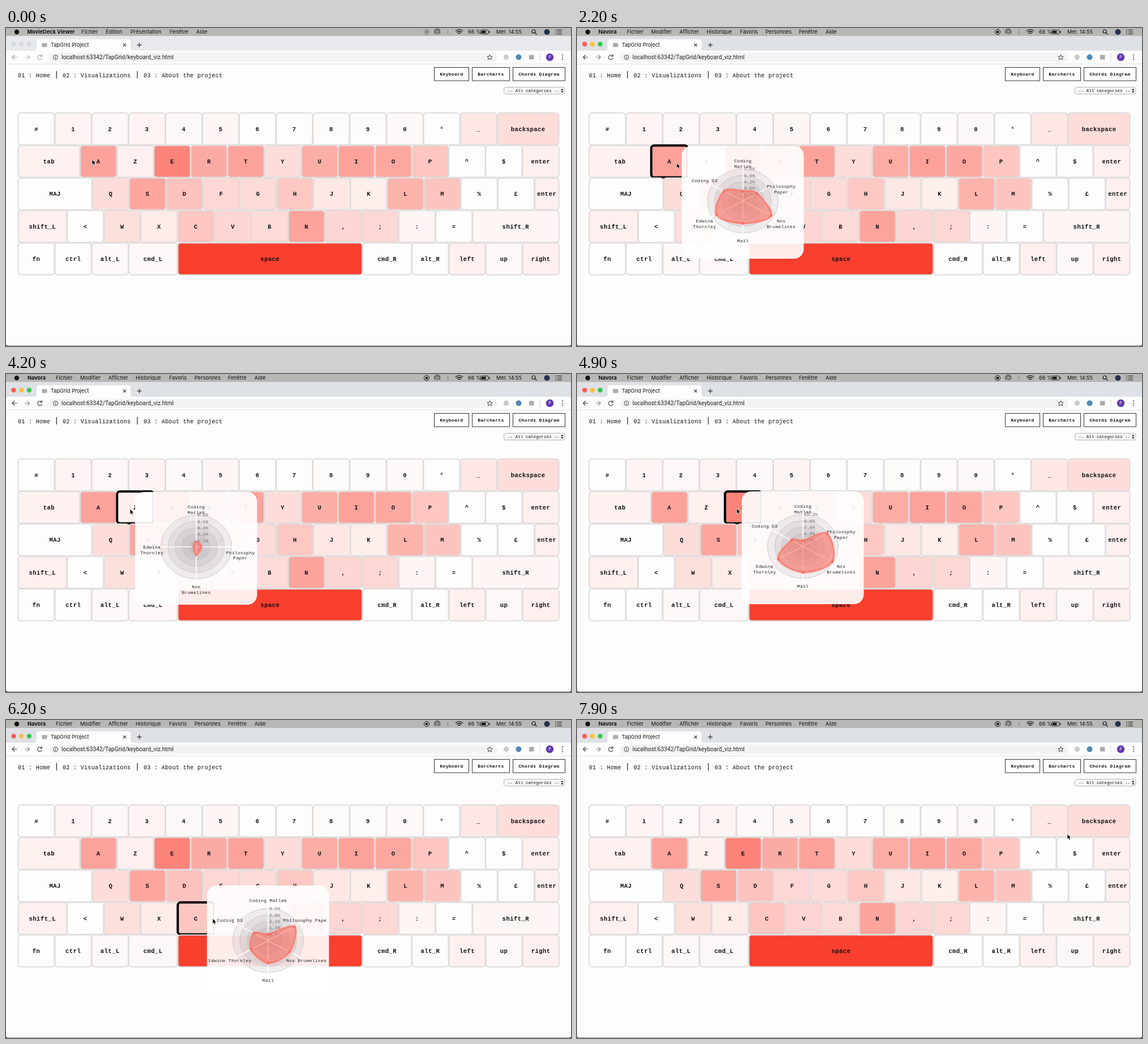
Write an HTML page that moves like this. It is 998 px wide and 561 px high and loops after 8 s.

```html
<!DOCTYPE html>
<html lang="fr">
<head>
<meta charset="utf-8">
<title>Keyboard heat map</title>
<style>
html, body { margin: 0; height: 100%; overflow: hidden; background: #222; }
svg { display: block; width: 998px; height: 561px; }
text { fill: #111; font-family: "Liberation Mono", monospace; }
.ui { font: 9.2px Inter, sans-serif; }
.strong { font-weight: 700; }
.url { font: 10.2px Roboto, sans-serif; fill: #222; }
.nav { font-size: 10.2px; letter-spacing: .22px; }
.btn { font-size: 8px; font-weight: 700; letter-spacing: .35px; }
.select { font-size: 7.6px; }
.key { font-size: 10.6px; font-weight: 700; letter-spacing: .42px; }
.label { font-size: 8px; letter-spacing: .3px; fill: #222; }
.pct { font-size: 8px; fill: #737373; }
.mid { text-anchor: middle; }
.line { fill: none; stroke: #444; stroke-width: 1.2; }
</style>
</head>
<body>
<svg viewBox="0 0 998 561">
  <defs>
    <clipPath id="inner"><rect x="3" width="209" height="270"/></clipPath>
    <filter id="glow" x="-30%" y="-30%" width="160%" height="160%">
      <feGaussianBlur stdDeviation="1.4" result="b"/>
      <feMerge><feMergeNode in="b"/><feMergeNode in="SourceGraphic"/></feMerge>
    </filter>
  </defs>
  <g id="window"></g>
  <g id="keys"></g>
  <g id="panel"></g>
  <path id="cursor" d="M0 0V9.6L2.2 7.6L3.8 11L5.5 10.2L4 6.9H7Z" fill="#000" stroke="#fff" stroke-width=".8"/>
</svg>
<script>
const $ = id => document.getElementById(id);
const text = (x, y, s, cls) => `<text x="${x}" y="${y}" dy=".35em" class="${cls}">${s}</text>`;
const rect = (x, y, w, h, fill, more = '') => `<rect x="${x}" y="${y}" width="${w}" height="${h}" fill="${fill}" ${more}/>`;
const dot = (x, y, r, fill, more = '') => `<circle cx="${x}" cy="${y}" r="${r}" fill="${fill}" ${more}/>`;
const path = (d, more = '') => `<path class="line" d="${d}" ${more}/>`;

// Browser window and menu bar
const menus = [
  [['MovieDeck Viewer', 37.5], ['Fichier', 133], ['Édition', 176], ['Présentation', 220], ['Fenêtre', 289], ['Aide', 336]],
  [['Navora', 38], ['Fichier', 88], ['Modifier', 131], ['Afficher', 181], ['Historique', 229], ['Favoris', 288],
    ['Personnes', 333], ['Fenêtre', 392], ['Aide', 439]]
];

function drawWindow(active) {
  const lights = active ? ['#fc5b57', '#fdbd40', '#34c84a'] : ['#d6d8da', '#d6d8da', '#d6d8da'];
  const tint = active ? '#444' : '#a5a8ab';
  const rec = active ? '#111' : '#777';
  return rect(0, 0, 998, 14, '#b7b7b5') +
    dot(19, 7, 4.2, '#111') +
    menus[+active].map(([s, x], i) => text(x, 7, s, i ? 'ui' : 'ui strong')).join('') +
    dot(743, 7, 4.5, 'none', `stroke="${rec}"`) + rect(741, 5, 4, 4, rec) +
    path('M758.5 10.5a5 5 0 1 1 6.5 0M760.3 9a2.8 2.8 0 1 1 3 0M761.8 7V11.5', 'stroke="#555"') +
    path('M778 4.5L782.5 9L780.3 11V3L782.5 5L778 9.5', 'style="stroke:#999;stroke-width:.8"') +
    path('M794 5.2Q800.5 0 807 5.2M796.2 7.6Q800.5 4 804.8 7.6M798.4 9.8Q800.5 8 802.6 9.8', 'style="stroke:#111;stroke-width:1.4"') +
    text(816, 7, '66 %', 'ui') +
    rect(838.5, 3.5, 13.5, 7, 'none', 'rx="1.5" stroke="#111" stroke-width=".9"') +
    rect(840, 5, 7.5, 4, '#111') + rect(853, 5.5, 1.5, 3, '#111') +
    text(866, 7, 'Mer. 14:55', 'ui') +
    dot(932, 6, 3, 'none', 'stroke="#111" stroke-width="1.2"') + path('M934.2 8.2L937.5 11.5', 'style="stroke:#111"') +
    dot(955.5, 7, 5, '#24304f') +
    path('M970 3.5h2M970 7h2M970 10.5h2M973.5 3.5H982M973.5 7H982M973.5 10.5H982', 'style="stroke:#111"') +
    // tabs
    rect(0, 14, 998, 40, active ? '#dee1e5' : '#e7e9ec') +
    lights.map((c, i) => dot(13.5 + 13.7 * i, 28.5, 4.2, c)).join('') +
    '<path d="M50 40Q54 40 54 36V24Q54 20 58 20H216Q220 20 220 24V36Q220 40 224 40Z" fill="#fdfdfd"/>' +
    rect(63.5, 26.5, 9, 7, '#aaa') +
    text(79, 30, 'TapGrid Project', 'ui') +
    path('M207 27.5L212 32.5M212 27.5L207 32.5') + path('M231.5 30H239.5M235.5 26V34', 'style="stroke-width:1.4"') +
    // toolbar
    rect(0, 40, 998, 520.5, '#fdfdfd', 'rx="3"') +
    path('M19.5 51.5H11M15 47.5L11 51.5L15 55.5', `style="stroke:${tint}"`) +
    path('M33 51.5H41.5M37.5 47.5L41.5 51.5L37.5 55.5', `style="stroke:${active ? '#888' : '#bbb'}"`) +
    path('M62.6 49A4 4 0 1 0 63.5 53M63.5 46.5V49.8H60', `style="stroke:${tint}"`) +
    rect(76, 43.5, 792, 16.5, '#f1f3f4', 'rx="8.2"') +
    dot(87.5, 51.7, 4, 'none', 'stroke="#444"') + path('M87.5 51V54M87.5 49V50') +
    text(98, 51.7, 'localhost:63342/TapGrid/keyboard_viz.html', 'url') +
    path('M854.5 47L855.9 50.2L859.2 50.4L856.7 52.6L857.5 56L854.5 54.1L851.5 56L852.3 52.6L849.8 50.4L853.1 50.2Z', 'style="stroke-width:1"') +
    dot(883.5, 51.5, 4.7, '#c9cccb') + dot(905.5, 51.5, 5, '#4d87b5') + rect(924, 47.5, 8.5, 8, '#aaa') +
    path('M943 44V59', 'style="stroke:#ddd"') +
    dot(960.5, 51.5, 6.7, '#6236ae') + `<text x="960.5" y="51.5" dy=".35em" class="ui mid" style="fill:#fff;font-size:7px">P</text>` +
    [47.5, 51.5, 55.5].map(y => dot(983, y, 1.1, '#444')).join('') +
    rect(0, 63, 998, 1, '#dedfe1') +
    // page header
    text(21, 83, '01 : Home', 'nav') + text(100, 83, '02 : Visualizations', 'nav') + text(243, 83, '03 : About the project', 'nav') +
    path('M89.3 76V89M232 76V89', 'style="stroke:#222"') +
    [['Keyboard', 756.5, 61], ['Barcharts', 823.5, 66], ['Chords Diagram', 895.5, 92]].map(([s, x, w]) =>
      rect(x, 69.5, w, 23.5, '#fff', 'stroke="#333"') + text(x + w / 2, 81.5, s, 'btn mid')).join('') +
    rect(879.5, 104.5, 107.5, 12, '#f6f6f6', 'rx="3" stroke="#b5b5b5"') +
    text(886, 110.5, '-- All categories --', 'select') +
    '<path d="M980 109.7L982.3 106.8L984.6 109.7ZM980 111.5L982.3 114.4L984.6 111.5Z" fill="#222"/>';
}

// Keyboard: "label heat [width]"
const UNIT = 65.1, LEFT = 21, TOP = 149.3, ROW = 57.35;
const rows = [
  '# 0|1 5|2 3|3 5|4 2|5 4|6 0|7 0|8 1|9 1|0 2|° 0|_ 11|backspace 17 109.7',
  'tab 6 109.7|A 48|Z 7|E 64|R 43|T 48|Y 17|U 42|I 48|O 45|P 29|^ 0|$ 0|enter 7',
  'MAJ 0 131.3|Q 17|S 46|D 31|F 20|G 18|H 28|J 11|K 8|L 39|M 30|% 0|£ 0|enter 7 43.5',
  'shift_L 7 86.6|&lt; 0|W 16|X 9|C 29|V 21|B 18|N 47|, 21|; 20|: 4|= 0|shift_R 4 153.3',
  'fn 0|ctrl 0|alt_L 2|cmd_L 3 86.8|space 100 326.5|cmd_R 0 87.2|alt_R 0|left 7|up 3|right 7'
];
const heatColor = h => `rgb(${254 - .05 * h},${253 - 1.9 * h},${253 - 2.07 * h})`;
const keys = rows.flatMap((row, r) => {
  let x = LEFT;
  return row.split('|').map(s => {
    const [label, heat, width = UNIT] = s.split(' ');
    const key = { label, heat, x, y: TOP + r * ROW, w: +width };
    x += key.w;
    return key;
  });
});
$('keys').innerHTML = keys.map(k =>
  rect(k.x + .5, k.y + .5, k.w - .9, ROW - 1, heatColor(k.heat), 'rx="5"') +
  text(k.x + k.w / 2, k.y + ROW / 2, k.label, 'key mid')).join('');
const keyRects = [...$('keys').querySelectorAll('rect')];

// Radar panels: anchor, largest share, value on each axis
const RX = 62.5, RY = 56.5, CX = 108, CY = 97;
const six = ['Coding Matlab', ' Philosophy Paper', 'Nos Brumelines', 'Mail', 'Edwina Thornley', 'Coding D3'];
const four = [six[0], six[1], six[2], six[4]];
const radars = {
  A: { at: [176, 238], max: 7, v: [.3, .46, .92, .7, .86, .61] },
  Z: { at: [219, 238], max: .64, v: [.17, .14, .25, .08], names: four },
  E: { at: [282, 237], max: 12.3, v: [.18, .79, .96, .81, .8, .37] },
  D: { at: [315, 275], max: 4.2, v: [.4, .7, .8, .65, .9, .55] },
  C: { at: [346, 322], max: 3.5, v: [.2, .86, .7, .7, .55, .46], oneLine: true },
  space: { at: [386, 402], max: 16.7, v: [.26, .72, .92, .77, .97, .23] }
};

// Closed Catmull-Rom curve
function smooth(p) {
  const n = p.length, at = i => p[(i + n) % n];
  return 'M' + p[0] + p.map((a, i) => {
    const [o, b, c] = [at(i - 1), at(i + 1), at(i + 2)];
    const c1 = a.map((v, k) => v + (b[k] - o[k]) / 6), c2 = b.map((v, k) => v - (c[k] - a[k]) / 6);
    return `C${c1} ${c2} ${b}`;
  }).join('') + 'Z';
}

function drawPanel({ at, max, v, names = six, oneLine }) {
  const point = (i, f) => {
    const a = 2 * Math.PI * i / v.length;
    return [CX + RX * f * Math.sin(a), CY - RY * f * Math.cos(a)];
  };
  const pts = v.map((f, i) => point(i, f)), levels = [5, 4, 3, 2, 1];
  const labels = names.map((name, i) => {
    const [x, y] = point(i, 1.25);
    const lines = oneLine || name === 'Coding D3' ? [name.trim()] : name.split(' ');
    return lines.map((s, j) => text(x, y + 9.8 * j, s, 'label mid')).join('');
  }).join('');
  return `<g transform="translate(${at[0] + 9} ${at[1] - 30})">` +
    rect(0, 0, 215.5, 199, '#fff', 'rx="17" fill-opacity=".9"') + '<g clip-path="url(#inner)">' +
    levels.map(j => `<ellipse cx="${CX}" cy="${CY}" rx="${RX * j / 5}" ry="${RY * j / 5}" fill="#8a858a" fill-opacity=".13" stroke="#c4c0c6" stroke-width=".8"/>`).join('') +
    levels.map(j => text(CX + 2, CY - RY * j / 5, (max * j / 5).toFixed(1) + '%', 'pct')).join('') +
    v.map((_, i) => `<path d="M${CX} ${CY}L${point(i, 1.1)}" stroke="#fff" stroke-width="1.6"/>`).join('') + labels +
    `<g filter="url(#glow)"><path d="${smooth(pts)}" fill="#ff6f61" fill-opacity=".35" stroke="#fa7567" stroke-width="1.6"/>` +
    pts.map(([x, y]) => dot(x, y, v.length > 4 ? 2.3 : 1.5, '#fa7062')).join('') + '</g></g></g>';
}

// Pointer path: time, x, y
const track = [
  [0, 152, 232], [700, 152, 232], [1000, 176, 238], [3100, 176, 238], [3500, 219, 238], [4500, 219, 238],
  [4900, 282, 237], [5600, 282, 237], [5900, 315, 277], [6100, 346, 322], [6200, 365, 350],
  [6450, 379, 385], [6800, 386, 402], [7200, 386, 402], [7900, 866, 201], [8000, 866, 201]
];
function pointer(t) {
  const i = track.findIndex(p => p[0] > t), [a, b] = [track[i - 1], track[i]];
  const f = (t - a[0]) / (b[0] - a[0]);
  return [a[1] + (b[1] - a[1]) * f, a[2] + (b[2] - a[2]) * f];
}

let wasActive, wasHover;
function frame(now) {
  const t = Math.floor(now % 8000 / 100) * 100;
  const active = t >= 1000, [x, y] = pointer(t);
  const hover = active && t < 7850 ? keys.findIndex(k => x >= k.x && x < k.x + k.w && y >= k.y && y < k.y + ROW) : -1;
  if (active !== wasActive) $('window').innerHTML = drawWindow(active);
  if (hover !== wasHover) {
    keyRects.forEach((r, i) => {
      r.setAttribute('stroke', i === hover ? '#000' : '#dedcdd');
      r.setAttribute('stroke-width', i === hover ? 4 : 2);
    });
    const radar = hover >= 0 && radars[keys[hover].label];
    $('panel').innerHTML = radar ? drawPanel(radar) : '';
  }
  wasActive = active;
  wasHover = hover;
  $('cursor').setAttribute('transform', `translate(${x} ${y})`);
  requestAnimationFrame(frame);
}
requestAnimationFrame(frame);
</script>
</body>
</html>
```
